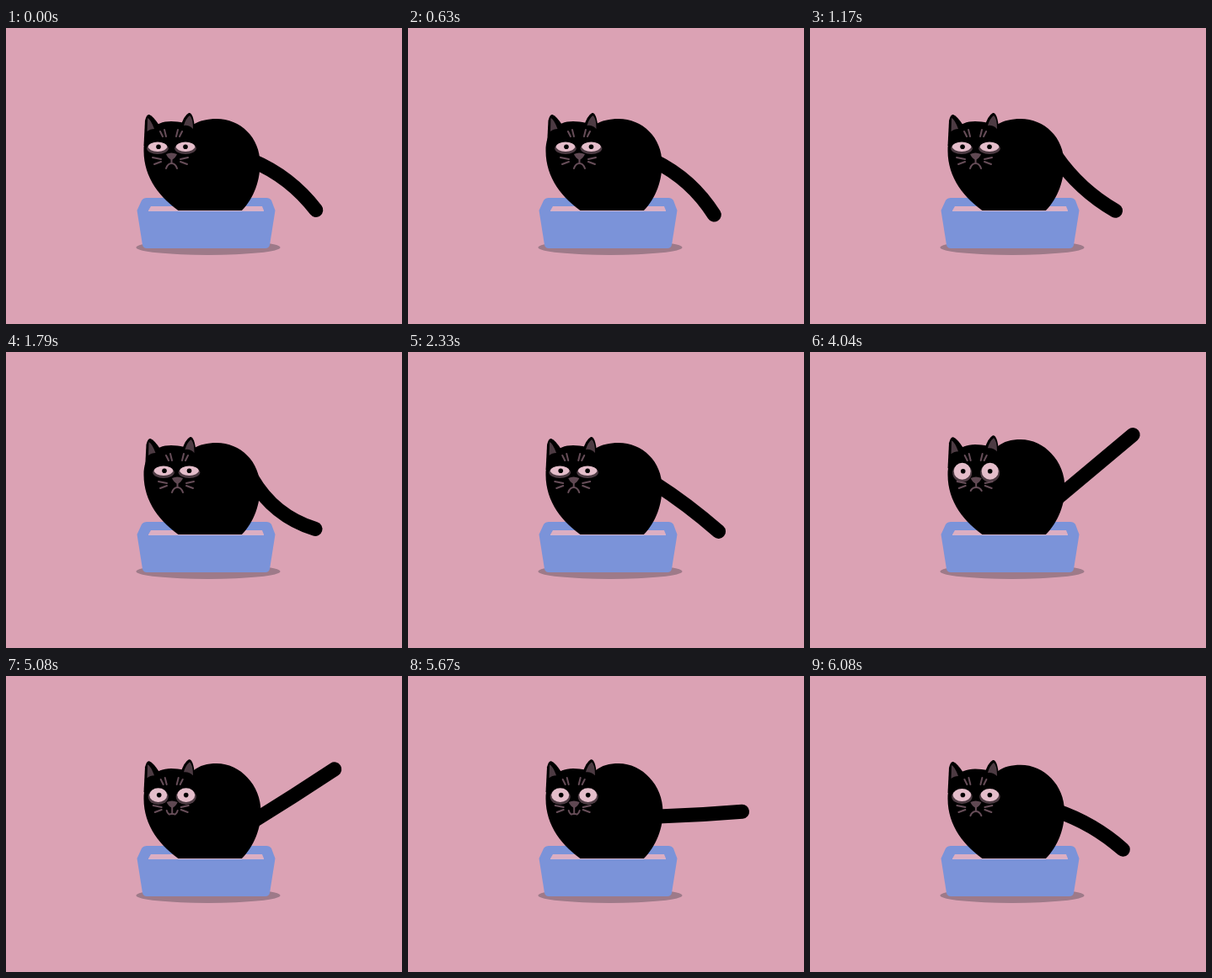
Write an HTML page that moves like this. It is 470x352 px and loops after 6180 ms.

```html
<!DOCTYPE html>
<html lang="en">
<head>
<meta charset="utf-8">
<title>Cat in a litter box</title>
<style>
html, body { margin: 0; width: 100%; height: 100%; overflow: hidden; background: #dba2b4; }
svg { display: block; width: 100vw; height: 100vh; }
.line { fill: none; stroke: #664d58; stroke-width: 2; stroke-linecap: round; stroke-linejoin: round; }
.inner { fill: #4d3b43; }
.white { fill: #e4bdca; }
</style>
</head>
<body>
<svg viewBox="0 0 470 352">
  <rect width="470" height="352" fill="#dba2b4"/>
  <ellipse cx="240" cy="261" rx="85.5" ry="9" fill="#9e7a89"/>
  <path d="M167 202H309Q313 202 315 205L319.500 217H155.500L161 205Q163 202 167 202Z" fill="#7b93d9"/>
  <path d="M172 212H304L306 217H169Z" fill="#dcaec2"/>
  <path id="tail" fill="none" stroke="#000" stroke-width="17" stroke-linecap="round"/>
  <path id="body"/>
  <g id="ears">
    <path d="M163.500 140L165 110Q167 102 170 103Q175 105 182 116L178 136Z"/>
    <path d="M207 118Q211 104 217 101Q222 100 224 118L220 134Z"/>
    <path class="inner" d="M168 107Q172 109 176 120Q171 120 167.500 123Z"/>
    <path class="inner" d="M218 104Q222 107 222 120Q217 115 211 116Q213 108 218 104Z"/>
  </g>
  <g id="face">
    <path class="line" d="M183 123l3 6M188 121l2 8M204 121l-2 8M209 123l-3 6"/>
    <g id="eyeL"><ellipse class="inner"/><ellipse class="white"/><circle r="2.8" cx="1"/></g>
    <g id="eyeR"><ellipse class="inner"/><ellipse class="white"/><circle r="2.8"/></g>
    <path class="line" d="M174 154l10 2M176 162l8 -3M207 156l9 -2M207 159l8 3"/>
    <path d="M190 150Q196 147 203 150Q201 155 196.500 157Q192 155 190 150Z" fill="#5f4852"/>
    <path id="mouth" class="line"/>
  </g>
  <path d="M155.500 217H319.500L313 258Q312 262 308 262H167Q163 262 162 258Z" fill="#7b93d9"/>
  <path d="M169 217.500H306" stroke="#d3b3cc"/>
</svg>
<script>
const LOOP = 6180, HOLD = 6080;
const $ = id => document.getElementById(id);
const mix = (a, b, k) => a + (b - a) * k;
const progress = (t, from, to) => Math.min(1, Math.max(0, (t - from) / (to - from)));
const ease = (t, from, to) => {
  const u = progress(t, from, to);
  return u * u * (3 - 2 * u);
};

// Tail poses: angle below the horizontal, length, upward bow, height of the root
function wagPose(t) {
  const phase = 2 * Math.PI * (t - 330) / 2540;
  return [40 + 3 * Math.sin(phase), 96, 20 * Math.cos(phase) - 1, 154.5 + 4.5 * Math.cos(phase)];
}

function raisedPose(drop) {
  return [80 * drop - 40, 119 - 31 * drop, 14 * drop - 8 * Math.sin(Math.PI * drop), 175 - 17 * drop];
}

function drawTail(t) {
  const raised = raisedPose(progress(t, 4600, LOOP) ** 2), up = ease(t, 2540, 2680);
  const [degrees, length, bow, y] = wagPose(t).map((v, i) => mix(v, raised[i], up));
  const angle = degrees * Math.PI / 180, x = 292;
  const dx = Math.cos(angle), dy = Math.sin(angle), half = length / 2;
  $('tail').setAttribute('d', `M${x} ${y}`
    + `Q${x + half * dx + bow * dy} ${y + half * dy - bow * dx} ${x + length * dx} ${y + length * dy}`);
}

function drawBody(lift, sway) {
  const top = 108 - 4 * lift, right = 301.5 + lift, brow = 111 - lift;
  $('body').setAttribute('d',
    `M209 220C183 203 163.500 178 163.500 146C163.500 124 176 ${brow} 196 ${brow}`
    + `C207 ${brow} 215 ${brow + 3} 222 ${brow + 4 - lift}`
    + `C230 ${top + 2} 239 ${top} 250 ${top}`
    + `C278 ${top} ${right} 130 ${right} 161C${right} 185 292 206 277 220Z`);
  $('ears').setAttribute('transform', `translate(${sway} ${-1.7 * lift})`);
}

function drawEye(id, x, y, alert) {
  const eye = $(id), [shade, white] = eye.children;
  const rx = 11.3 - 1.3 * alert, ry = 5.7 + 4.3 * alert;
  eye.setAttribute('transform', `translate(${x} ${y})`);
  white.setAttribute('rx', rx);
  white.setAttribute('ry', ry);
  shade.setAttribute('rx', rx + 1.5);
  shade.setAttribute('ry', ry + 1);
  shade.setAttribute('cy', 2);
}

function drawFace(look, alert, smile, shift) {
  $('face').setAttribute('transform', `translate(${shift} 0)`);
  const eyeY = 141.3 + 0.5 * alert;
  drawEye('eyeL', 180, eyeY, alert);
  drawEye('eyeR', 213 - 2.5 * look, eyeY, alert);
  const corner = mix(167 - 2 * alert, 160, smile);
  const bend = mix(161, 167, smile), mid = mix(161, 163, smile);
  $('mouth').setAttribute('d',
    `M196.500 156V${mid}M190 ${corner}Q192 ${bend} 196.500 ${mid}Q201 ${bend} 203 ${corner}`);
}

function render(t) {
  const startle = ease(t, 2540, 2670), settle = ease(t, 5850, HOLD);
  const alert = startle - 0.4 * ease(t, 4600, 5000) - 0.18 * settle;
  const lift = startle - 0.45 * settle;
  const smile = ease(t, 4650, 4950) - settle;
  const look = t < 2400 ? (1 - Math.cos(t / 1200 * 2 * Math.PI)) / 2 : 0;
  const shake = t > 2720 && t < 4000 ? 0.4 * Math.sin(t / 80 * Math.PI) : 0;
  drawTail(t);
  drawBody(lift, 1.5 * look + shake);
  drawFace(look, alert, smile, 7 * look + 0.7 * lift + shake);
}

const start = performance.now();
function tick() {
  render(Math.min((performance.now() - start) % LOOP, HOLD));
  requestAnimationFrame(tick);
}
tick();
</script>
</body>
</html>
```
